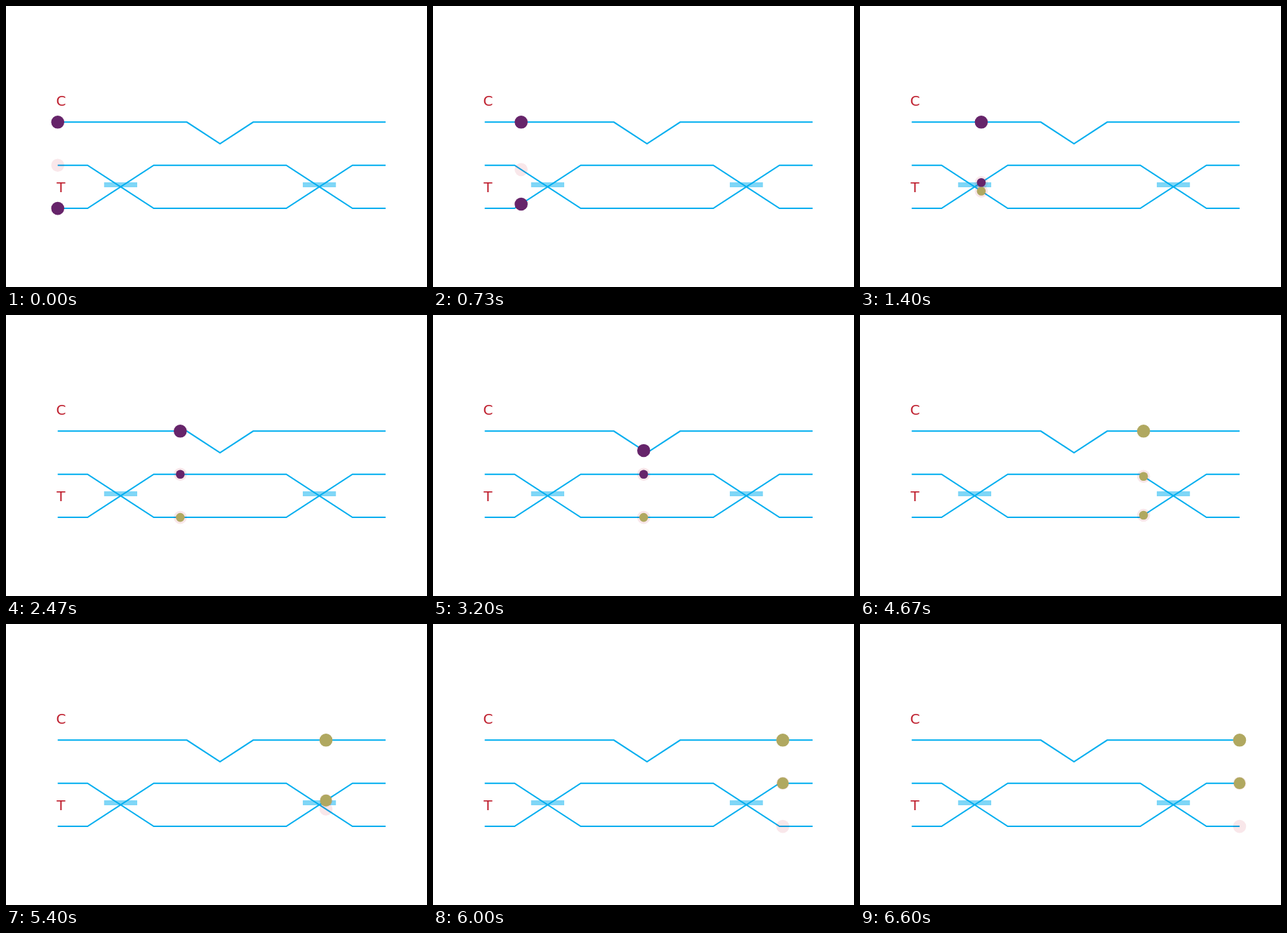
An HTML page for the animation above (6.67 s loop, 600 px wide and 400 px high).

```html
<!DOCTYPE html>
<html lang="en">
<head>
<meta charset="utf-8">
<title>Two-path gate</title>
<style>
  html, body { margin: 0; width: 100%; height: 100%; overflow: hidden; background: #fff; }
  svg { display: block; width: 600px; height: 400px; }
  .wire { fill: none; stroke: #00aeef; stroke-width: 2; }
  .splitter { fill: #00aeef; opacity: .5; }
  .halo { fill: #c8102e; opacity: .1; }
  text { font: 20px "DejaVu Sans", sans-serif; fill: #be1e2d; text-anchor: middle; }
</style>
</head>
<body>
<svg viewBox="0 0 600 400">
  <rect class="splitter" x="139.8" y="251" width="47.2" height="7"/>
  <rect class="splitter" x="423" y="251" width="47.2" height="7"/>
  <path class="wire" d="M73.7 165.3H257.8L305 196L352.2 165.3H541"/>
  <path class="wire" d="M73.7 226.7H116.2L210.6 288.1H399.4L493.8 226.7H541"/>
  <path class="wire" d="M73.7 288.1H116.2L210.6 226.7H399.4L493.8 288.1H541"/>
  <text x="78.4" y="142">C</text>
  <text x="78.4" y="265">T</text>
  <circle class="halo" id="upperHalo" r="9.3"/>
  <circle class="halo" id="lowerHalo" r="9.3"/>
  <circle id="control"/>
  <circle id="lower"/>
  <circle id="upper"/>
</svg>
<script>
const PURPLE = "#66246a", GOLD = "#b0a860";
const LOOP = 6670, UNIT = 47.2, LEFT = 69;
const MIDDLE = 257.4, HALF_GAP = 30.7;
const FULL = 9.3, SPLIT = 6.3, MERGED = 8.4;
const el = id => document.getElementById(id);

// Three steps every 200 ms, on a 10 ms clock
function stepAt(t) {
  const rest = t % 200;
  return 3 * Math.floor(t / 200) + (rest >= 70) + (rest >= 130);
}

function place(id, x, y, r, fill) {
  const dot = el(id);
  dot.setAttribute("cx", x);
  dot.setAttribute("cy", y);
  dot.setAttribute("r", r);
  if (fill) dot.setAttribute("fill", fill);
}

function draw(t) {
  const u = (stepAt(t) + 1) / 10;
  const x = LEFT + UNIT * u;
  const dip = HALF_GAP * Math.max(0, 1 - Math.abs(u - 5));
  const offset = HALF_GAP * Math.min(1, Math.abs(u - 2), Math.abs(u - 8));
  const top = MIDDLE - offset, bottom = MIDDLE + offset;
  const before = u <= 2, after = u > 8;
  const color = u <= 5 ? PURPLE : GOLD;

  place("upperHalo", x, top, FULL);
  place("lowerHalo", x, bottom, FULL);
  place("control", x, 165.3 + dip, FULL, color);
  place("upper", x, top, before ? 0 : after ? MERGED : SPLIT, color);
  place("lower", x, bottom, before ? FULL : after ? 0 : SPLIT, before ? PURPLE : GOLD);
}

let start;
function tick(now) {
  start ??= now;
  draw((now - start) % LOOP);
  requestAnimationFrame(tick);
}
draw(0);
requestAnimationFrame(tick);
</script>
</body>
</html>
```
